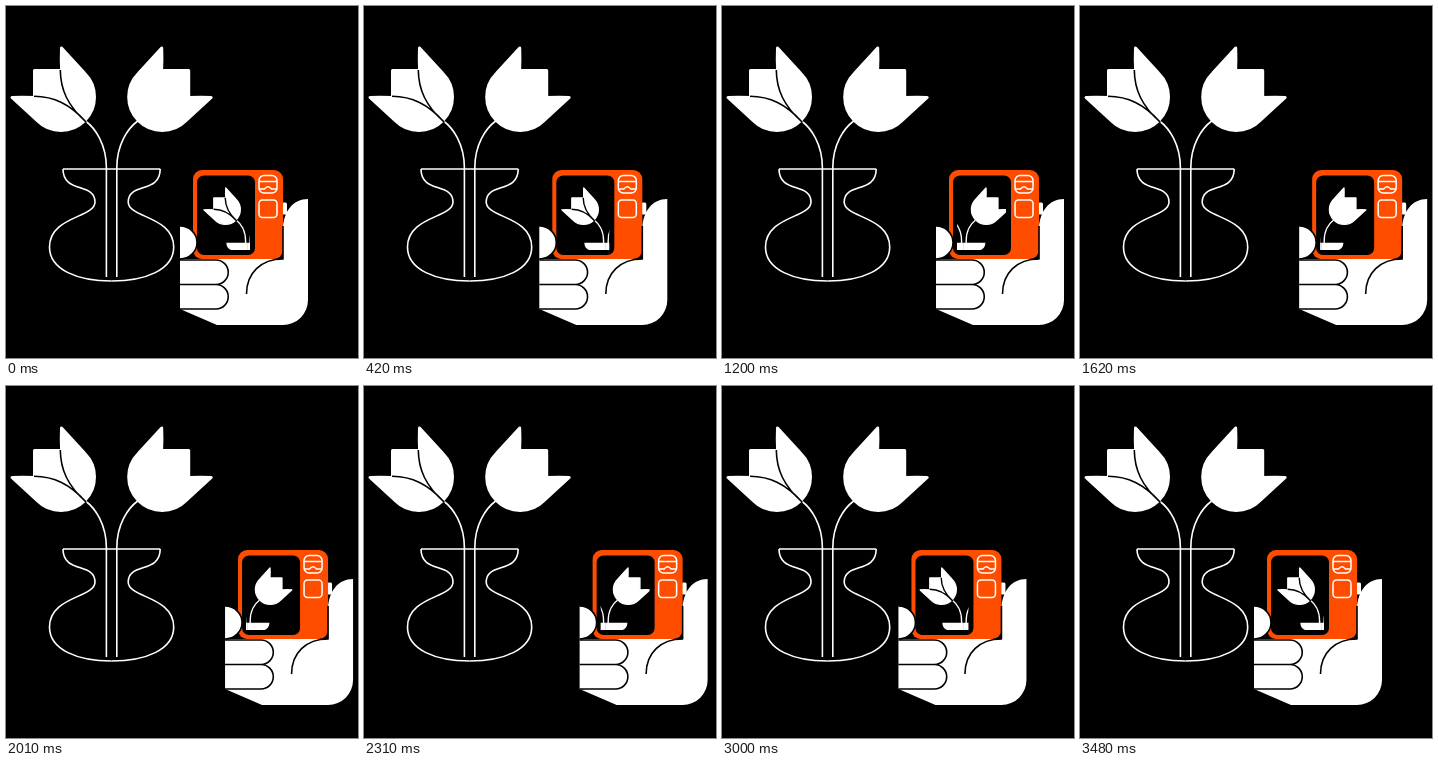
Recreate the animation shown at these times as an HTML page with a canvas. Size 352 by 352 pixels, loop 3510 ms.

```html
<!DOCTYPE html>
<html>
<head>
<meta charset="utf-8">
<style>
  html, body { margin: 0; width: 100%; height: 100%; overflow: hidden; background: #000; }
  canvas { display: block; width: 352px; height: 352px; }
</style>
</head>
<body>
<canvas id="stage" width="352" height="352"></canvas>
<script>
const ctx = document.getElementById('stage').getContext('2d');
const LOOP = 3510, STEP = 30, TRAVEL = 45.5, AXIS = 105.6;
const WHITE = '#fff', BLACK = '#000', ORANGE = '#ff4d00';

// A half disc with two pointed petals and a square corner between them.
const tulip = new Path2D('M55.5 42 L78.7 67.3 A33.5 33.5 0 0 1 31.3 114.7 L6 91.5 ' +
  'Q17 91 28.5 91.6 V64.5 H55.6 Q55 53 55.5 42 Z');
const petalLines = new Path2D('M54.3 64 C54.5 84 62 100 80 116 C64 98 48 90.5 28 90.3');
const stem = new Path2D('M79.5 115 C89 122 100.4 138 100.4 162 V271');
const halfVase = `M57 163 C57 188 89 176 89 196 C89 212 43.5 210 43.5 241 C43.5 264 72 275 ${AXIS} 275`;
const vaseSide = new Path2D(halfVase);
const vaseHalf = new Path2D(halfVase + ' V163 Z');

const palm = new Path2D('M174 253 H277 V222 C278 205 287 193 302 193 V294 ' +
  'A25 25 0 0 1 277 319 H211 L174 303 Z');
const thumbLine = new Path2D('M277 220 V253 C255 253 240.5 267 240.5 288');
const fingers = new Path2D('M174 254 H210 A12 12 0 0 1 210 278.5 H174 ' +
  'M210 278.5 A12 12 0 0 1 210 303 H174');
const indexTip = new Path2D('M174 220 A17 16.5 0 0 1 174 253');

function fill(path, color) {
  ctx.fillStyle = color;
  ctx.fill(path);
}

function stroke(path, color, width = 1.6) {
  ctx.strokeStyle = color;
  ctx.lineWidth = width;
  ctx.stroke(path);
}

function box(x, y, w, h, r) {
  const path = new Path2D();
  path.roundRect(x, y, w, h, r);
  return path;
}

// Runs the drawing twice, the second time flipped around the vase axis.
function mirrored(draw) {
  draw(false);
  ctx.save();
  ctx.translate(2 * AXIS, 0);
  ctx.scale(-1, 1);
  draw(true);
  ctx.restore();
}

function drawFlowers(width) {
  mirrored(flipped => {
    stroke(stem, WHITE, width);
    fill(tulip, WHITE);
    stroke(tulip, WHITE, 3);
    if (!flipped) stroke(petalLines, BLACK, width);
  });
}

function drawVase() {
  mirrored(() => stroke(vaseSide, WHITE));
  stroke(new Path2D('M57 163 H154.2'), WHITE);
}

function drawPreview(shift) {
  ctx.save();
  ctx.beginPath();
  ctx.rect(195 + shift, 174, 49, 70);
  ctx.clip();
  ctx.translate(195.2, 163.4);
  ctx.scale(0.442, 0.442);
  drawFlowers(3.2);
  ctx.translate(0, 3);
  mirrored(() => fill(vaseHalf, WHITE));
  ctx.restore();
}

function drawDevice() {
  fill(box(276, 196.5, 5, 12, 1.5), WHITE);
  fill(box(187, 164, 90, 89, 9), ORANGE);
  fill(box(191, 169.5, 58, 79.5, 7), BLACK);
  stroke(box(253, 169.5, 18, 17.5, 5), WHITE, 1.5);
  stroke(new Path2D('M253 175.5 H271 M253 183 H258.5 Q262 178.5 265.5 183 H271'), WHITE, 1.3);
  stroke(box(253, 194, 18, 17.5, 3.5), WHITE, 1.5);
}

function drawHand(shift) {
  ctx.save();
  ctx.translate(shift, 0);
  fill(palm, WHITE);
  drawDevice();
  stroke(thumbLine, BLACK);
  fill(indexTip, WHITE);
  stroke(indexTip, BLACK);
  stroke(fingers, BLACK);
  ctx.restore();
}

// Symmetric curve equal to cubic-bezier(.8, 0, .2, 1).
function ease(x) {
  if (x <= 0) return 0;
  if (x >= 1) return 1;
  let lo = 0, hi = 1;
  for (let i = 0; i < 24; i++) {
    const s = (lo + hi) / 2, q = 1 - s;
    if (2.4 * s * q * q + 0.6 * s * s * q + s ** 3 < x) lo = s;
    else hi = s;
  }
  return lo * lo * (3 - 2 * lo);
}

function handShift(t) {
  return TRAVEL * (ease((t - 65) / 1750) - ease((t - 1805) / 1620));
}

function render(t) {
  const shift = handShift(t);
  ctx.fillStyle = BLACK;
  ctx.fillRect(0, 0, 352, 352);
  drawFlowers(1.6);
  drawVase();
  drawHand(shift);
  drawPreview(shift);
}

ctx.lineJoin = 'round';
const start = performance.now();

function tick() {
  const t = (performance.now() - start) % LOOP;
  render(Math.floor(t / STEP) * STEP);
  requestAnimationFrame(tick);
}
tick();
</script>
</body>
</html>
```
